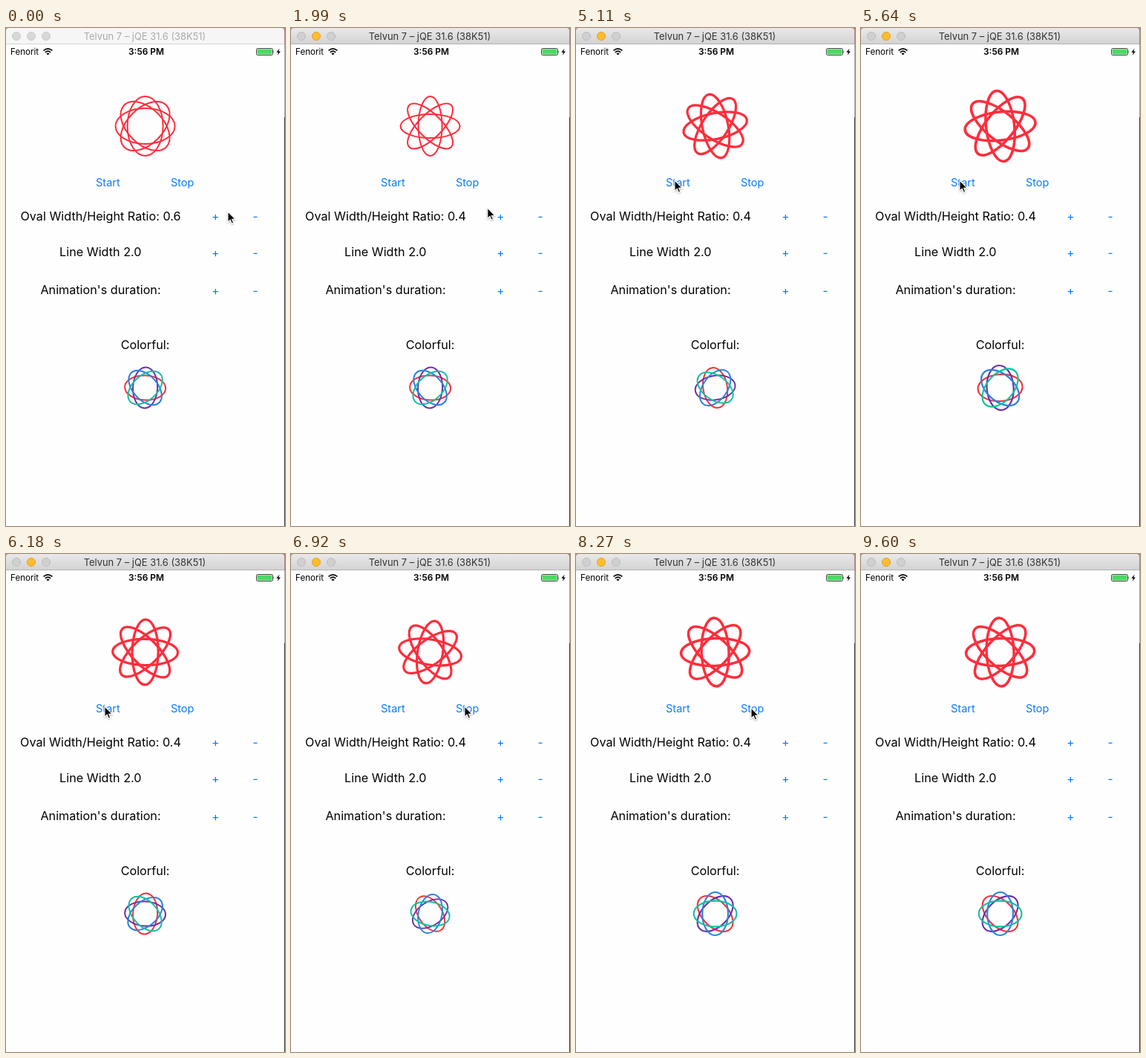
An HTML page for the animation above (9.96 s loop, 376 px wide and 670 px high).

```html
<!DOCTYPE html>
<html lang="en">
<head>
<meta charset="utf-8">
<title>Atom loader demo</title>
<style>
  html, body { margin: 0; width: 100%; height: 100%; overflow: hidden; background: #fff; }
  svg { display: block; width: 376px; height: 670px; }
  text { font-family: Inter, Roboto, sans-serif; font-size: 16.2px; text-anchor: middle; }
  .btn { font-size: 14.5px; fill: #0a7aff; }
  .sign { font-size: 15.5px; }
  ellipse { fill: none; }
</style>
</head>
<body>
<svg viewBox="0 0 376 670">
  <defs>
    <linearGradient id="bar" x1="0" y1="0" x2="0" y2="1">
      <stop offset="0" stop-color="#e9e9e9"/>
      <stop offset="1" stop-color="#d2d2d2"/>
    </linearGradient>
  </defs>

  <rect width="376" height="22" fill="#b98183"/>
  <rect y="22" width="376" height="648" fill="#fefefe"/>
  <path id="titleBar" d="M0 22V4Q0 0 4 0H371Q375 0 375 4V22Z"/>
  <path id="titleLine" d="M0 21.5H375"/>
  <g id="lights" stroke-width="1">
    <circle cx="14" cy="11" r="5.5"/>
    <circle cx="34" cy="11" r="5.5"/>
    <circle cx="54" cy="11" r="5.5"/>
  </g>
  <text id="title" x="187" y="15.7" style="font-size:12.9px">Telvun 7 – jQE 31.6 (38K51)</text>
  <path d="M375.5 22V120" stroke="#aaa"/>
  <path d="M375.5 120V670" stroke="#3a3a3a"/>

  <text x="6" y="36.4" style="font-size:11.6px;text-anchor:start">Fenorit</text>
  <g fill="none" stroke="#000" stroke-width="1.7">
    <path d="M50.6 30.4Q56.5 25.2 62.4 30.4"/>
    <path d="M52.8 32.8Q56.5 29.6 60.2 32.8"/>
    <path d="M54.4 34.3Q56.5 32.6 58.6 34.3L56.5 36.6Z" fill="#000" stroke="none"/>
  </g>
  <text x="189" y="36.4" style="font-size:11.9px;font-weight:600">3:56 PM</text>
  <rect x="337.5" y="27.5" width="22" height="9" rx="1.8" fill="#fff" stroke="#333" stroke-width=".9"/>
  <rect x="338.5" y="28.5" width="20" height="7" rx=".8" fill="#4cd964"/>
  <path d="M360.5 30.3Q362 32 360.5 33.8Z" fill="#333"/>
  <path d="M368.6 27.6L364.4 32.8H367L365.8 36.8L370 31.4H367.4Z"/>

  <g id="logo"></g>
  <g id="colorful"></g>

  <text class="btn" id="start" x="137.4" y="212.7">Start</text>
  <text class="btn" id="stop" x="237.7" y="212.7">Stop</text>
  <text id="ratio" x="127.5" y="258.6"></text>
  <text x="127.3" y="307.4">Line Width 2.0</text>
  <text x="127.5" y="358.4">Animation's duration:</text>
  <text x="187.5" y="432.3">Colorful:</text>
  <text class="btn sign" x="282.4" y="258.5">+</text>
  <text class="btn sign" id="ratioMinus" x="336" y="258.8">-</text>
  <text class="btn sign" id="widthPlus" x="282.4" y="308">+</text>
  <text class="btn sign" x="336" y="308.2">-</text>
  <text class="btn sign" x="282.4" y="358.5">+</text>
  <text class="btn sign" x="336" y="358.8">-</text>

  <path id="cursor" d="M0 0V14.2L3.2 11.2L5.4 16.2L7.7 15.2L5.6 10.4H10.2Z"
        stroke="#fff" stroke-width="1.1" style="filter:drop-shadow(0 1px 1px rgba(0,0,0,.3))"/>
</svg>

<script>
const LOOP = 9960;
const TILT = 2.5; // resting angle of the colorful atom
const $ = id => document.getElementById(id);
const clamp = v => Math.min(1, Math.max(0, v));

// Each row is [time, ...values]
const CURSOR = [
  [50, 299, 247], [310, 334, 251], [1760, 334, 251], [1990, 266, 242],
  [2150, 80, 258], [2300, 166, 250], [2430, 205, 219], [2700, 268, 262],
  [2880, 288, 340], [3190, 282, 293], [3990, 282, 293], [4060, 276, 300],
  [4320, 131, 199], [4410, 133, 205], [6260, 133, 205], [6740, 234, 205],
  [7400, 234, 205], [7560, 236, 207], [9070, 236, 207], [9320, 292, 370],
  [9500, 340, 570], [9600, 345, 674]
];
const TURNS = [[4710, 0], [5110, .217], [6180, .752], [6920, 1.15], [7870, 1.619]];

function sample(keys, t) {
  if (t <= keys[0][0]) return keys[0].slice(1);
  const i = keys.findIndex(k => k[0] > t);
  if (i < 0) return keys[keys.length - 1].slice(1);
  const a = keys[i - 1], b = keys[i];
  const k = (t - a[0]) / (b[0] - a[0]);
  return a.slice(1).map((v, j) => v + (b[j + 1] - v) * k);
}

function makeAtom(id, radius, petals) {
  return petals.map(([angle, color]) => {
    const e = document.createElementNS('http://www.w3.org/2000/svg', 'ellipse');
    e.setAttribute('rx', radius);
    e.setAttribute('ry', radius * .6);
    e.setAttribute('stroke', color);
    e.setAttribute('stroke-width', 2);
    e.setAttribute('transform', `rotate(${angle})`);
    $(id).append(e);
    return e;
  });
}

const logoPetals = makeAtom('logo', 40, [0, 45, 90, 135].map(a => [a, '#ff2d3c']));
makeAtom('colorful', 27.5, [[0, '#f5333a'], [90, '#6a31a6'], [45, '#2a80dc'], [135, '#12c0a2']]);

function place(id, y, angle, scale) {
  $(id).setAttribute('transform', `translate(187.6 ${y}) rotate(${angle}) scale(${scale})`);
}

// Dim on touch, then fade back
function press(id, t, ...times) {
  const dim = times.some(p => t >= p && t < p + 100);
  const last = times.filter(p => t >= p).pop();
  const fade = last === undefined ? 1 : clamp((t - last - 100) / 250);
  $(id).setAttribute('opacity', dim ? .2 : .2 + .8 * fade);
}

function paintWindow(active) {
  $('titleBar').setAttribute('fill', active ? 'url(#bar)' : '#f6f6f6');
  $('titleLine').setAttribute('stroke', active ? '#b5b5b5' : '#d4d4d4');
  $('title').setAttribute('fill', active ? '#333' : '#aaa');
  [...$('lights').children].forEach((c, i) => {
    const on = active && i === 1;
    c.setAttribute('fill', on ? '#ffbd2e' : active ? '#d0d0d0' : '#d8d8d8');
    c.setAttribute('stroke', on ? '#e0a028' : active ? '#bcbcbc' : '#cacaca');
  });
}

function render(t) {
  paintWindow(t >= 730);

  const ratio = t < 830 ? .6 : t < 1450 ? .5 : .4;
  $('ratio').textContent = 'Oval Width/Height Ratio: ' + ratio.toFixed(1);
  logoPetals.forEach(e => {
    e.setAttribute('ry', 40 * ratio);
    e.setAttribute('stroke-width', t < 3560 ? 2 : 3);
  });

  const [turn] = sample(TURNS, t);
  const swell = .2 * (1 - Math.abs(1 - 2 * (turn % 1)));
  place('logo', 132, turn * 360, 1 + swell);
  place('colorful', 484, turn * 360 + TILT, t < 4710 ? 1 : .9 + swell);

  press('ratioMinus', t, 730, 1350);
  press('widthPlus', t, 3460);
  press('start', t, 4710);
  press('stop', t, 7860);

  const [x, y] = sample(CURSOR, t);
  $('cursor').setAttribute('transform', `translate(${x} ${y})`);
}

const began = performance.now();
function tick() {
  render((performance.now() - began) % LOOP);
  requestAnimationFrame(tick);
}
tick();
</script>
</body>
</html>
```
